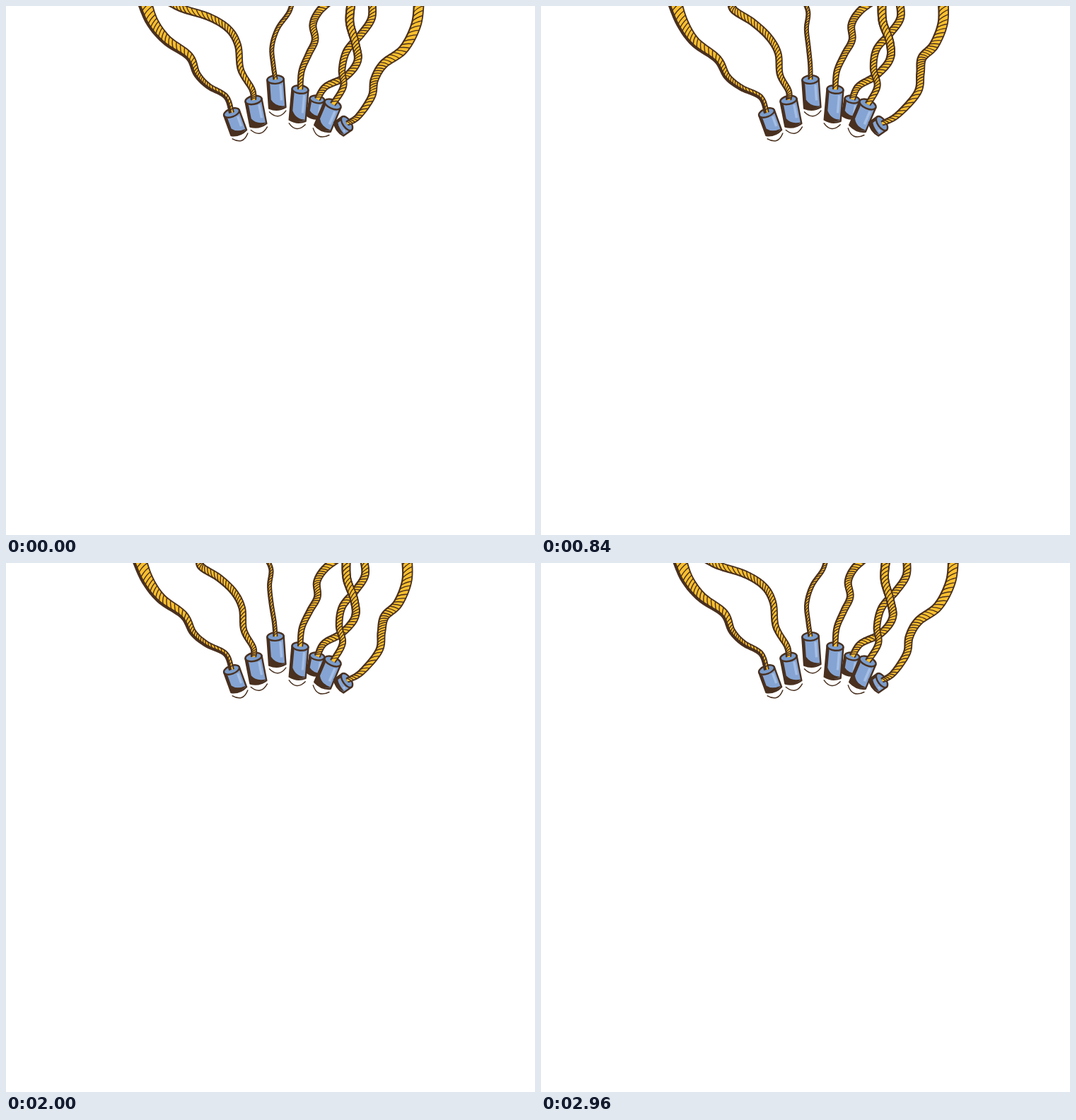
An HTML page for the animation above (3 s loop, 748 px wide and 748 px high).

```html
<!DOCTYPE html>
<html lang="en">
<head>
<meta charset="utf-8">
<title>Swaying ropes</title>
<style>
html, body { margin: 0; width: 100%; height: 100%; overflow: hidden; background: #fff; }
svg { display: block; width: 100vw; height: 100vh; }
</style>
</head>
<body>
<svg id="stage" viewBox="0 0 748 748">
  <defs><clipPath id="upper"><rect x="440" y="-30" width="100" height="104"/></clipPath></defs>
</svg>
<script>
const INK = '#49301f', GOLD = '#fcc02e', BLUE = '#85a4d3', TOP = '#7a9ccb', LIGHT = '#a5bee4';
const LOOP = 3000, STEP = 40, SAMPLES = 12;
const stage = document.getElementById('stage');

// knots: bends at rest, from the top edge down to the cap.
// shift moves the top, bend the middle, ripple the two halves in opposite directions.
const ropes = {
  farLeft: {
    knots: [[194, -12], [206, 21], [227, 48], [259, 71], [270, 96], [286, 113], [311, 128], [319, 151]],
    width: [8, 22], taper: 2, shade: 2.4, shift: -9, bend: [-8, 5], ripple: 3,
    cap: { tilt: -20, radius: 11.5, length: 30, ring: true }
  },
  left: {
    knots: [[224, -10], [248, 3], [288, 16], [315, 33], [328, 56], [332, 90], [348, 118], [350, 133]],
    width: [8, 12], shift: 60, ease: 4, bend: [5, 14], ripple: 5,
    cap: { tilt: -11, radius: 11.7, length: 36, ring: true }
  },
  thin: {
    knots: [[406, -10], [400, 9], [384, 32], [376, 58], [378, 84], [381, 104]],
    width: [7, 7], shift: -46, bend: [8, 0], ripple: 4,
    cap: { tilt: -4, radius: 11.7, length: 40, ring: true }
  },
  middle: {
    knots: [[462, -10], [443, 7], [434, 26], [437, 48], [428, 68], [418, 92], [416, 118]],
    width: [8, 12], shift: 15, bend: [0, 0], ripple: 0,
    cap: { tilt: 5, radius: 11.5, length: 44, ring: true }
  },
  twistBack: {
    knots: [[489, -10], [486, 22], [494, 53], [497, 78], [480, 100], [452, 114], [440, 132]],
    width: [9, 13], shift: -9, bend: [-3, -2], ripple: -7,
    cap: { tilt: 10, radius: 10.5, length: 25 }
  },
  twistFront: {
    knots: [[517, -10], [517, 17], [502, 40], [482, 63], [475, 90], [477, 114], [462, 139]],
    width: [9, 12], shift: -14, bend: [-6, -2], ripple: 0,
    cap: { tilt: 23, radius: 12.3, length: 37, ring: true }
  },
  right: {
    knots: [[584, -10], [580, 26], [562, 61], [534, 82], [521, 104], [517, 128], [498, 156], [482, 166]],
    width: [7, 16], shift: -20, bend: [18, -11], ripple: 12,
    cap: { tilt: 55, radius: 11.5, length: 14 }
  }
};

function add(parent, tag, attrs) {
  const node = document.createElementNS('http://www.w3.org/2000/svg', tag);
  for (const key in attrs) node.setAttribute(key, attrs[key]);
  return parent.appendChild(node);
}

function addCap({ knots, cap }) {
  const [x, y] = knots.at(-1), { tilt, radius: r, length: n, ring } = cap, ry = r * .5;
  const g = add(stage, 'g', { transform: `translate(${x} ${y}) rotate(${tilt})` });
  const outline = { stroke: INK, 'stroke-width': 2.4, 'stroke-linejoin': 'round' };
  if (ring) add(g, 'path', {
    d: `M${-r} ${n + 5}Q0 ${n + 2 * ry + 7} ${r} ${n + 5}`,
    fill: 'none', stroke: INK, 'stroke-width': 1.5, 'stroke-linecap': 'round'
  });
  add(g, 'path', { d: `M${-r} 0V${n}Q0 ${n + ry} ${r} ${n}V0Z`, fill: BLUE, ...outline });
  add(g, 'path', { d: `M${-r} 0L${-r * .7} ${ry}V${n * .7}Q${-r * .2} ${n - 1} ${r} ${n - 2}Q0 ${n + ry} ${-r} ${n}Z`, fill: INK });
  add(g, 'path', { d: `M${r * .55} ${ry + 2}V${n * .75}`, stroke: LIGHT, 'stroke-width': r * .3 });
  add(g, 'ellipse', { rx: r, ry, fill: TOP, ...outline });
}

function addRope(rope, clip) {
  const g = add(stage, 'g', clip ? { 'clip-path': `url(#${clip})` } : {});
  (rope.views ||= []).push({
    edge: add(g, 'path', { fill: INK }),
    body: add(g, 'path', { fill: GOLD }),
    twist: add(g, 'path', { fill: 'none', stroke: INK, 'stroke-width': 1.4, 'stroke-linecap': 'round' })
  });
}

function spline(a, b, c, d, t) {
  return b + .5 * t * (c - a + t * (2 * a - 5 * b + 4 * c - d + t * (3 * (b - c) + d - a)));
}

// The top follows a half sine; the middle swings in a shorter, earlier pulse.
function sway({ knots, shift, ease = 2, bend, ripple }, phase) {
  const slide = Math.sin(Math.PI * phase);
  const pulse = Math.sin(Math.PI * phase ** .8) ** 2;
  return knots.map(([x, y], i) => {
    const free = 1 - i / (knots.length - 1);
    const arch = Math.sin(Math.PI * free);
    const wave = ripple * Math.sin(2 * Math.PI * free) * arch;
    return [
      x + shift * free ** ease * slide + (bend[0] * arch ** 2 + wave) * pulse,
      y + bend[1] * arch ** 2 * pulse
    ];
  });
}

function trace(rope, phase) {
  const points = sway(rope, phase), last = points.length - 1, total = last * SAMPLES;
  const { width: [thin, thick], taper = .6 } = rope;
  const at = i => points[Math.max(0, Math.min(last, i))];
  const line = Array.from({ length: total + 1 }, (_, i) => {
    const k = Math.min(last - 1, Math.floor(i / SAMPLES)), t = i / SAMPLES - k;
    return [0, 1].map(c => spline(at(k - 1)[c], at(k)[c], at(k + 1)[c], at(k + 2)[c], t));
  });
  return line.map(([x, y], i) => {
    const p = line[Math.max(0, i - 1)], q = line[Math.min(total, i + 1)];
    const dx = q[0] - p[0], dy = q[1] - p[1], len = Math.hypot(dx, dy) || 1;
    const half = (thin + (thick - thin) * (1 - i / total) ** taper) / 2;
    return { x, y, half, nx: -dy / len, ny: dx / len };
  });
}

const offset = (p, d) => `${(p.x + p.nx * d).toFixed(2)} ${(p.y + p.ny * d).toFixed(2)}`;

function ribbon(line, insetA, insetB) {
  const a = line.map(p => offset(p, p.half - insetA));
  const b = line.map(p => offset(p, insetB - p.half)).reverse();
  return 'M' + a.concat(b).join('L') + 'Z';
}

function twists(line) {
  let d = '';
  for (let i = 0; i + 3 < line.length; i += 2) {
    const p = line[i], m = line[i + 1], q = line[i + 3];
    d += `M${offset(p, 1 - p.half)}Q${offset(m, m.half * .2)} ${offset(q, q.half - 1)}`;
  }
  return d;
}

function draw(phase) {
  for (const rope of Object.values(ropes)) {
    const line = trace(rope, phase);
    const shapes = {
      edge: ribbon(line, 0, 0),
      body: ribbon(line, 1.8 + (rope.shade || .4), 1.8),
      twist: twists(line)
    };
    for (const view of rope.views)
      for (const part in shapes) view[part].setAttribute('d', shapes[part]);
  }
}

for (const rope of Object.values(ropes)) {
  addCap(rope);
  addRope(rope);
  // The back strand crosses over the front one in its upper half.
  if (rope === ropes.twistFront) addRope(ropes.twistBack, 'upper');
}

const start = performance.now();
function tick() {
  const elapsed = (performance.now() - start) % LOOP;
  draw(Math.floor(elapsed / STEP) * STEP / LOOP);
  requestAnimationFrame(tick);
}
tick();
</script>
</body>
</html>
```
